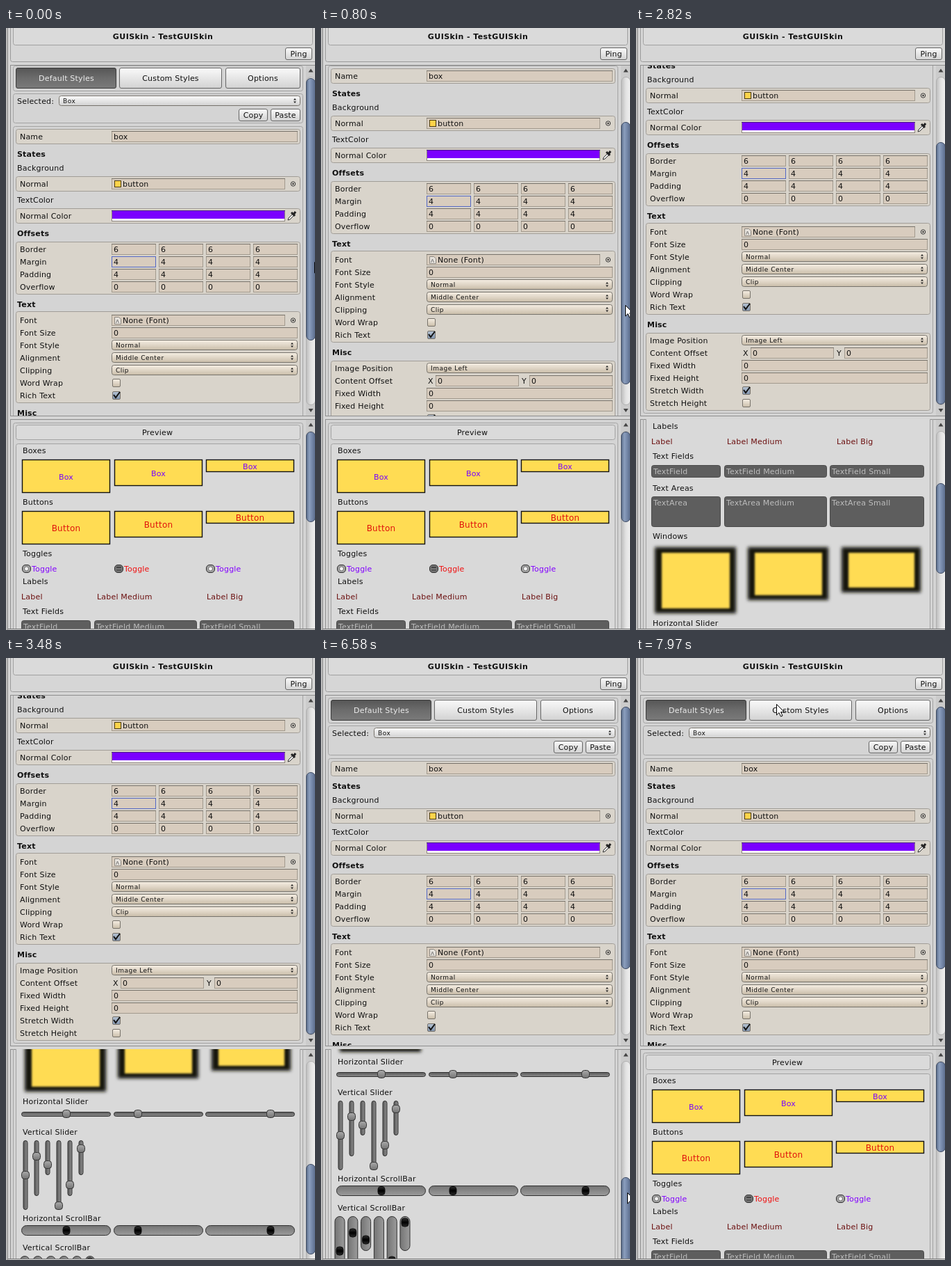
Recreate the animation shown at these times as an HTML page. Size 445 by 865 pixels, loop 8 s.

```html
<!DOCTYPE html>
<html lang="en">
<head>
<meta charset="utf-8">
<title>Skin inspector</title>
<style>
html, body { margin: 0; width: 100%; height: 100%; overflow: hidden; background: #d6d6d6; }
svg { display: block; }
text { font: 11px "DejaVu Sans", sans-serif; letter-spacing: .2px; fill: #101010; white-space: pre; }
.b { font-weight: bold; }
.title { letter-spacing: .43px; }
.s { font-size: 9px; letter-spacing: .52px; }
.l { font-size: 12px; letter-spacing: .25px; }
</style>
</head>
<body>
<svg id="stage" width="445" height="865" viewBox="0 0 445 865"></svg>
<script>
const LOOP = 8000;

// Moments when the picture changes: [first, last, count]
const BURSTS = [
  [140, 1040, 8], [1190, 1760, 5], [2030, 2970, 8], [3090, 3740, 6],
  [4420, 5240, 7], [5640, 6580, 8], [6700, 7700, 8], [7850, 7970, 2]
];

// Scroll offsets: [time, pixels]
const UPPER = [[0, 3], [140, 8], [783, 90], [1040, 110], [1190, 114], [1618, 130],
  [4693, 130], [5103, 82], [5240, 0]];
const LOWER = [[2030, 0], [2164, 9], [2970, 330], [3090, 345], [3480, 441], [3740, 498],
  [6580, 498], [6700, 480], [7414, 0]];
// Pointer: [time, x, y]
const POINTER = [[0, 444, 336], [140, 443, 340], [783, 438, 398], [1040, 440, 412],
  [1190, 441, 415], [1618, 443, 427], [1760, 460, 428], [2030, 443, 635], [2298, 444, 650],
  [2432, 460, 665], [4283, 460, 640], [4420, 440, 596], [4693, 440, 452], [5103, 439, 418],
  [5240, 460, 358], [5640, 443, 403], [6043, 430, 560], [6580, 441, 768], [6700, 441, 762],
  [7414, 442, 602], [7700, 440, 543], [7850, 320, 290], [7970, 202, 66]];

const rect = (x, y, w, h, fill, line = "none", r = 0, extra = "") =>
  `<rect x="${x + .5}" y="${y + .5}" width="${w - 1}" height="${h - 1}" rx="${r}" fill="${fill}" stroke="${line}" ${extra}/>`;
const fillRect = (x, y, w, h, fill) =>
  `<rect x="${x}" y="${y}" width="${w}" height="${h}" fill="${fill}"/>`;
const path = (d, fill, line = "none", width = 1) =>
  `<path d="${d}" fill="${fill}" stroke="${line}" stroke-width="${width}"/>`;
const circle = (x, y, r, fill, line = "none") =>
  `<circle cx="${x}" cy="${y}" r="${r}" fill="${fill}" stroke="${line}"/>`;

// Text placed by its vertical middle
function label(str, x, y, cls = "", color = "#101010", anchor = "start") {
  return `<text x="${x}" y="${y + (cls === "s" ? 3.4 : 4)}" class="${cls}" text-anchor="${anchor}" style="fill:${color}">${str}</text>`;
}
const centred = (str, x, y, cls, color) => label(str, x, y, cls, color, "middle");

function gradient(id, stops, across = false) {
  const end = across ? 'x2="1" y2="0"' : 'x2="0" y2="1"';
  const parts = stops.map((c, i) => `<stop offset="${i / (stops.length - 1)}" stop-color="${c}"/>`);
  return `<linearGradient id="${id}" x1="0" y1="0" ${end}>${parts.join("")}</linearGradient>`;
}

const frame = (x, y, w, h) => rect(x, y, w, h, "none", "#a3a3a3", 3);
const group = (y, h) => rect(14, y, 410, h, "#d9d4cb", "#a19d97", 3);
const button = (str, x, y, w, h) =>
  rect(x, y, w, h, "url(#btn)", "#666", 2.5) + centred(str, x + w / 2, y + h / 2);

function field(x, y, w, str = "", active = false) {
  const edge = active ? "#5468c4" : "#a29a8e";
  return rect(x, y - 8, w, 16, "#d8ccbe", edge) +
    (active ? "" : fillRect(x, y - 8, w, 1, "#77726a")) + label(str, x + 3, y);
}

const arrows = (x, y) => path(`M${x - 2} ${y - 1}h4l-2 -2.6zM${x - 2} ${y + 1}h4l-2 2.6z`, "#222");

function popup(str, x, y, w, paint) {
  return rect(x, y - 8, w, 15, `url(#${paint})`, "#77736c", 3) +
    label(str, x + 6, y, "s") + arrows(x + w - 8, y - .5);
}

function check(y, on) {
  return rect(153, y - 6, 12, 12, on ? "url(#ticked)" : "url(#pop)", "#77726a", 1.5) +
    (on ? path(`M155 ${y - 1}l3 4l6 -8`, "none", "#111", 2) : "");
}

const picker = y => circle(413.5, y, 3.2, "none", "#333") + circle(413.5, y, 1.2, "#222");

function dropper(y) {
  return path(`M406 ${y + 7}l1 -3l6 -6l2 2l-6 6z`, "#eee", "#333") +
    path(`M411 ${y - 4}l5 5M414 ${y - 1}l3 -4`, "none", "#222", 3);
}

function upperContent() {
  const out = [
    frame(10, 57, 418, 37), rect(14, 60, 145, 30, "url(#tab)", "#3c3c3c", 2.5),
    centred("Default Styles", 87, 75, "", "#ececec"),
    button("Custom Styles", 163, 60, 148, 30), button("Options", 316, 60, 108, 30),
    frame(10, 97, 418, 43), label("Selected:", 16, 108), popup("Box", 76, 108, 348, "btn"),
    button("Copy", 335, 119, 42, 18), button("Paste", 381, 119, 43, 18),
    frame(10, 144, 418, 540),
    group(148, 22), group(216, 22), group(262, 22), group(310, 76), group(410, 132), group(568, 112)
  ];
  const heads = { States: 184, Offsets: 298, Text: 400, Misc: 556 };
  for (const h in heads) out.push(label(h, 16, heads[h], "b"));
  out.push(label("Background", 16, 204), label("TextColor", 16, 250));

  const column = (names, y) => names.forEach((n, i) => out.push(label(n, 20, y + 18 * i)));
  column(["Name"], 159);
  column(["Normal"], 227);
  column(["Normal Color"], 273);
  column(["Border", "Margin", "Padding", "Overflow"], 321);
  column(["Font", "Font Size", "Font Style", "Alignment", "Clipping", "Word Wrap", "Rich Text"], 423);
  column(["Image Position", "Content Offset", "Fixed Width", "Fixed Height", "Stretch Width", "Stretch Height"], 579);

  out.push(
    field(152, 159, 268, "box"),
    field(152, 227, 250), rect(156, 222, 10, 10, "#ffd34a", "#4a3b10"), label("button", 168, 227), picker(227),
    rect(152, 265, 250, 16, "#fff", "#8b857c"), fillRect(153, 266, 248, 11, "#7a00ff"),
    fillRect(152, 265, 250, 1, "#4a1c85"), dropper(272)
  );
  [6, 4, 4, 0].forEach((v, row) => {
    for (let i = 0; i < 4; i++) out.push(field(152 + 68 * i, 321 + 18 * row, 64, v, row === 1 && i === 0));
  });
  out.push(
    field(152, 423, 250), path("M156.5 418.5h6l3 3v7h-9z", "#e6e2dc", "#8d8880"),
    path("M158.500 427l2 -5l2 5", "none", "#777"), label("None (Font)", 168, 423), picker(423),
    field(152, 441, 268, "0"),
    popup("Normal", 152, 459, 268, "pop"), popup("Middle Center", 152, 477, 268, "pop"),
    popup("Clip", 152, 495, 268, "pop"), check(513, false), check(531, true),
    popup("Image Left", 152, 579, 268, "pop"),
    label("X", 154, 597), field(165, 597, 120, "0"), label("Y", 289, 597), field(300, 597, 120, "0"),
    field(152, 615, 268, "0"), field(152, 633, 268, "0"), check(651, true), check(669, false)
  );
  return out.join("");
}

const COLS = [[23, 48], [156, 38], [288, 18]];
const HEIGHTS = [100, 80, 50, 100, 80, 50];

function plates(y, str, cls, color) {
  return COLS.map(([x, h]) =>
    rect(x, y, 127, h, "#ffdc53", "#111", 0, 'stroke-width="1.4"') +
    centred(str, x + 63.5, y + h / 2 + .5, cls, color)).join("");
}

function toggle(x, color, mid) {
  const mark = mid ? fillRect(x + 3, 774, 7, 2, "#444") + fillRect(x + 3, 778, 7, 2, "#555")
    : circle(x + 6.5, 777, 3, "#f4f4f4", "#777");
  return rect(x, 771, 13, 12, mid ? "#777" : "#a2a2a2", "#2f2f2f", 4.5) + mark + label("Toggle", x + 14, 777, "", color);
}

const darkField = (x, w, str, y, h) =>
  rect(x, y, w, h, "#5e5e5e", "#4a4a4a", 3) + label(str, x + 3, y + 9, "", "#bdbdbd");

function blurred(x, w, bottom) {
  const top = 966, h = bottom - top;
  return `<g filter="url(#soft)">${fillRect(x + 4, top + 3, w - 8, h - 6, "#151208")}</g>` +
    `<g filter="url(#edge)">${fillRect(x + 14, top + 11, w - 27, h - 21, "#ffdc53")}</g>`;
}

const knob = (x, y) => rect(x - 6, y - 6, 12, 12, "url(#knob)", "#333", 4);
const blob = (x, y) => rect(x - 5.5, y - 6.5, 11, 13, "url(#blob)", "#111", 4);

function lowerContent() {
  const out = [
    frame(10, 567, 418, 900), rect(14, 570, 410, 22, "#dadada", "#a3a3a3", 3), centred("Preview", 218, 581),
    rect(14, 597, 410, 860, "#d9d9d9", "#a3a3a3", 3)
  ];
  const heads = {
    Boxes: 607, Buttons: 681, Toggles: 755, Labels: 795, "Text Fields": 838, "Text Areas": 884, Windows: 953,
    "Horizontal Slider": 1078, "Vertical Slider": 1122, "Horizontal ScrollBar": 1246, "Vertical ScrollBar": 1288
  };
  for (const h in heads) out.push(label(h, 24, heads[h]));
  out.push(
    plates(620, "Box", "", "#7a00ff"), plates(694, "Button", "l", "#e0140c"),
    toggle(23, "#8200ff"), toggle(156, "#f01010", true), toggle(288, "#8200ff"),
    label("Label", 22, 817, "", "#6b0f0f"), label("Label Medium", 131, 817, "", "#6b0f0f"),
    label("Label Big", 289, 817, "", "#6b0f0f"),
    blurred(23, 125, 1067), blurred(157, 124, 1048), blurred(292, 122, 1037)
  );
  [[22, 100, ""], [127, 148, " Medium"], [279, 136, " Small"]].forEach(([x, w, size]) => {
    out.push(darkField(x, w, "TextField" + size, 851, 18), darkField(x, w, "TextArea" + size, 896, 44));
  });
  [[22, 87], [155, 190], [287, 381]].forEach(([x, k]) => {
    out.push(rect(x, 1093, 129, 7, "url(#groove)", "#303030", 3), knob(k, 1096));
    out.push(rect(x, 1256, 129, 15, "url(#bar)", "#303030", 7), blob(k, 1263.500));
  });
  const knobs = [50, 23, 35, 94, 64, 12];
  const blobs = [50, 24, 34, 94, 64, 9];
  HEIGHTS.forEach((h, i) => {
    const x = 28 + 16 * i, bx = 27 + 18.8 * i;
    out.push(rect(x - 3.5, 1134, 7, h, "url(#grooveV)", "#303030", 3), knob(x, 1134 + knobs[i]));
    out.push(rect(bx - 7.5, 1300, 15, h, "url(#barV)", "#303030", 7), blob(bx, 1300 + blobs[i]));
  });
  return out.join("");
}

const scrollTrack = (y, h) => rect(432, y, 14, h, "url(#track)", "#b0b0b0", 6.5);
const thumb = (id, y, h) => `<g id="${id}">${rect(432, y, 14, h, "url(#thumb)", "#3f4c63", 6.5)}</g>`;
const clip = (id, y, h) => `<clipPath id="${id}"><rect x="0" y="${y}" width="445" height="${h}"/></clipPath>`;
const blur = (id, d) => `<filter id="${id}" x="-20%" y="-20%" width="140%" height="140%"><feGaussianBlur stdDeviation="${d}"/></filter>`;

const stage = document.getElementById("stage");
stage.innerHTML = `<defs>
  ${gradient("btn", ["#fafafa", "#e6e6e6", "#d2d2d2"])}
  ${gradient("tab", ["#565656", "#6c6c6c", "#7a7a7a"])}
  ${gradient("pop", ["#f5eee3", "#e0d6c7", "#c9bda9"])}
  ${gradient("ticked", ["#b6c3d3", "#8295ae"])}
  ${gradient("knob", ["#aaa", "#747474"])}
  ${gradient("blob", ["#303030", "#000", "#292929"])}
  ${gradient("groove", ["#5a5a5a", "#8d8d8d"])}
  ${gradient("grooveV", ["#5a5a5a", "#8d8d8d"], true)}
  ${gradient("bar", ["#747474", "#9b9b9b"])}
  ${gradient("barV", ["#747474", "#9b9b9b"], true)}
  ${gradient("track", ["#bcbcbc", "#e2e2e2", "#f0f0f0"], true)}
  ${gradient("thumb", ["#586a87", "#8c9fbe", "#7285a6", "#5b6c8a"], true)}
  ${blur("soft", 2.6)}${blur("edge", 1.4)}
  ${clip("upperClip", 54, 503)}${clip("lowerClip", 562, 301)}
</defs>
${fillRect(0, 0, 445, 865, "#d6d6d6")}
${fillRect(0, 0, 2, 865, "#bcbcbc")}${fillRect(2, 0, 1, 865, "#8c8c8c")}
${rect(6, -10, 450, 59, "none", "#9a9a9a", 3)}
${rect(10, -10, 432, 35, "#dadada", "#a0a0a0", 3)}
${centred("GUISkin - TestGUISkin", 226, 12, "b title")}
${button("Ping", 402, 28, 39, 18)}
${rect(6, 53, 450, 505, "#d4d4d4", "#8e8e8e")}
${rect(6, 562, 450, 302, "#d4d4d4", "#8e8e8e")}
<g clip-path="url(#upperClip)"><g id="upper">${upperContent()}</g></g>
<g clip-path="url(#lowerClip)"><g id="lower">${lowerContent()}</g></g>
${fillRect(432, 54, 13, 503, "#cbcbcb")}${fillRect(432, 563, 13, 300, "#cbcbcb")}
${scrollTrack(70, 472)}
<g clip-path="url(#lowerClip)">${scrollTrack(579, 400)}${thumb("lowerThumb", 580, 130)}</g>
${thumb("upperThumb", 70, 377)}
${path("M435.500 63.500h7l-3.500 -5zM435.500 547h7l-3.500 5zM435.500 572.500h7l-3.500 -5z", "#444")}
${fillRect(3, 863, 442, 1, "#777")}
<g id="pointer">${path("M.5 .5V16L4 12.600 6.500 18 9 17 6.600 11.700H11.500Z", "#fff", "#000")}</g>`;

const part = id => document.getElementById(id);
const [upper, lower, upperThumb, lowerThumb, pointer] =
  ["upper", "lower", "upperThumb", "lowerThumb", "pointer"].map(part);

// Latest change at or before t
function held(t) {
  let last = 0;
  for (const [a, b, n] of BURSTS) {
    if (t < a) break;
    const gap = (b - a) / (n - 1);
    last = a + gap * Math.min(n - 1, Math.floor((t - a) / gap + .01));
  }
  return last;
}

function at(keys, t) {
  const i = keys.findIndex(k => k[0] > t);
  if (i === 0) return keys[0].slice(1);
  if (i < 0) return keys[keys.length - 1].slice(1);
  const [p, q] = [keys[i - 1], keys[i]];
  const f = (t - p[0]) / (q[0] - p[0]);
  return p.slice(1).map((v, j) => Math.round(v + (q[j + 1] - v) * f));
}

const move = (el, x, y) => el.setAttribute("transform", `translate(${x} ${y})`);

function draw(now) {
  const t = held(now % LOOP);
  const [u] = at(UPPER, t), [l] = at(LOWER, t);
  move(upper, 0, -u);
  move(lower, 0, -l);
  move(upperThumb, 0, Math.round(u * .723));
  move(lowerThumb, 0, Math.round(l / 3));
  move(pointer, ...at(POINTER, t));
}

function tick() {
  draw(performance.now());
  requestAnimationFrame(tick);
}
tick();
</script>
</body>
</html>
```
